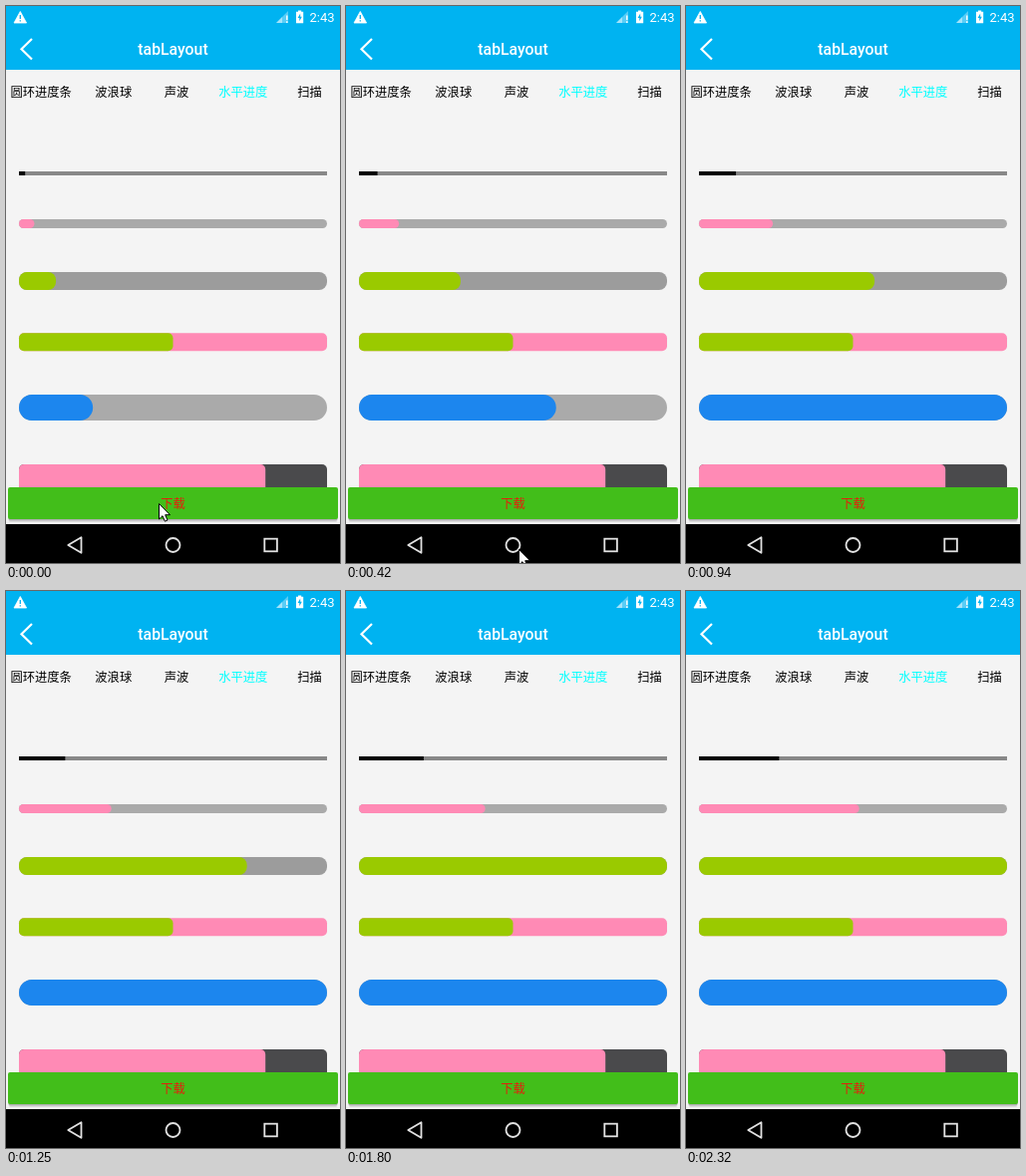
Animation of 335 by 559 pixels, one loop 2420 ms. Source, as an HTML page:

```html
<!DOCTYPE html>
<html lang="zh">
<head>
<meta charset="utf-8">
<title>tabLayout</title>
<style>
  html, body { margin: 0; width: 100%; height: 100%; overflow: hidden; background: #f4f4f4; }
  svg { display: block; width: 335px; height: 559px; }
  text { font-family: "Noto Sans CJK SC", "Noto Sans CJK", sans-serif; font-size: 12.3px; }
  .latin { font-family: Roboto, sans-serif; fill: #fff; }
  .line { fill: none; stroke: #e2e2e2; stroke-width: 1.8; }
</style>
</head>
<body>
<svg viewBox="0 0 335 559">
  <rect width="335" height="559" fill="#f4f4f4"/>

  <!-- status and title bar -->
  <rect width="335" height="64" fill="#00b3f1"/>
  <path d="M14.3 5.5L20.6 17H8z" fill="#fff" stroke="#fff" stroke-width=".8" stroke-linejoin="round"/>
  <path d="M14.3 9v4M14.3 14.2v1.4" stroke="#00b3f1" stroke-width="1.3"/>
  <path d="M283 5V17H271z" fill="#fff" opacity=".35"/>
  <path d="M277 11V17H271z" fill="#fff" opacity=".45"/>
  <path d="M281.8 9.5v4.6M281.8 15.3v1.7" stroke="#fff" stroke-width="1.4"/>
  <path d="M293 4.5h3.2v1.3h2V17.2h-7.2V5.8h2z" fill="#fff"/>
  <path d="M295.2 7.6l-2.6 4.4h1.7v3.2l2.5-4.4h-1.6z" fill="#00b3f1"/>
  <text class="latin" x="304.5" y="16" style="font-size:13px">2:43</text>
  <path d="M26 33L15.5 43.2L26 53.5" fill="none" stroke="#fff" stroke-width="2.2"/>
  <text class="latin" x="167.5" y="49" text-anchor="middle" style="font-size:15.8px;font-weight:500">tabLayout</text>

  <!-- tabs -->
  <text x="4.4" y="91.4">圆环进度条</text>
  <text x="89.3" y="91.4">波浪球</text>
  <text x="158.7" y="91.4">声波</text>
  <text x="213.2" y="91.4" fill="#0ff">水平进度</text>
  <text x="292.2" y="91.4">扫描</text>

  <g id="bars"></g>

  <!-- download button -->
  <rect x="2.5" y="485" width="330" height="33" rx="2" fill="#000" opacity=".1"/>
  <rect x="2.5" y="484" width="330" height="32.5" rx="2" fill="#000" opacity=".2"/>
  <rect x="2" y="483" width="331" height="32" rx="2" fill="#42be1a"/>
  <text x="167.5" y="503.6" text-anchor="middle" fill="#e81c0c" style="font-weight:500">下载</text>

  <!-- navigation bar -->
  <rect y="520" width="335" height="39" fill="#000"/>
  <path class="line" d="M75.5 533.2V548.8L62.3 541z" stroke-linejoin="round"/>
  <circle class="line" cx="167.5" cy="541" r="7"/>
  <rect class="line" x="259.3" y="534.7" width="12.6" height="12.6"/>

  <path id="cursor" d="M.5 .5V16L4 12.7L6.4 18.2L9 17L6.7 11.7H11.5z" fill="#fff" stroke="#000"/>
</svg>
<script>
  const LOOP = 2420, LEFT = 13, WIDTH = 309;
  const times = [0, 150, 270, 420, 545, 670, 790, 940, 1100, 1250, 1370, 1530, 1650, 1800, 1920, 2080, 2200, 2320];
  const green = [12, 19, 26, 33, 39, 45, 50, 57, 65, 74, 80, 87, 94];
  const blue = [24, 38, 50, 64, 76, 88, 98];
  const pointer = [[153, 499], [158, 502], [164, 506], [173, 545]];

  // Each bar: top, height, radius, track colour, fill colour, percent at (time, step)
  const bars = [
    [166, 4, 0, '#888', '#000', t => Math.floor(2.3 + t * .0104)],
    [214, 9, 4.5, '#aaa', '#ff8ab5', t => Math.floor(5.5 + t * .0202)],
    [267, 18, 8, '#9c9c9c', '#9aca00', (t, i) => green[i] ?? 100],
    [328.3, 18, 5, '#ff8ab5', '#9aca00', () => 50],
    [390, 26, 13, '#aaa', '#1c86ee', (t, i) => blue[i] ?? 100],
    [460, 40, 5, '#4a4a4c', '#ff8ab5', () => 80]
  ];

  const group = document.getElementById('bars');
  const cursor = document.getElementById('cursor');

  function addRect(y, height, rx, fill) {
    const rect = document.createElementNS('http://www.w3.org/2000/svg', 'rect');
    const attrs = { x: LEFT, y, width: WIDTH, height, rx, fill };
    for (const name in attrs) rect.setAttribute(name, attrs[name]);
    group.append(rect);
    return rect;
  }

  const fills = bars.map(([y, h, r, track, fill]) => {
    addRect(y, h, r, track);
    return addRect(y, h, r, fill);
  });

  function draw(now) {
    const time = now % LOOP;
    const step = times.findLastIndex(t => t <= time);
    bars.forEach((bar, i) => {
      fills[i].setAttribute('width', WIDTH * bar[5](times[step], step) / 100);
    });
    const spot = pointer[step];
    cursor.setAttribute('visibility', spot ? 'visible' : 'hidden');
    if (spot) cursor.setAttribute('transform', `translate(${spot})`);
  }

  let start;
  function tick(now) {
    start ??= now;
    draw(Math.max(0, now - start));
    requestAnimationFrame(tick);
  }
  draw(0);
  requestAnimationFrame(tick);
</script>
</body>
</html>
```
